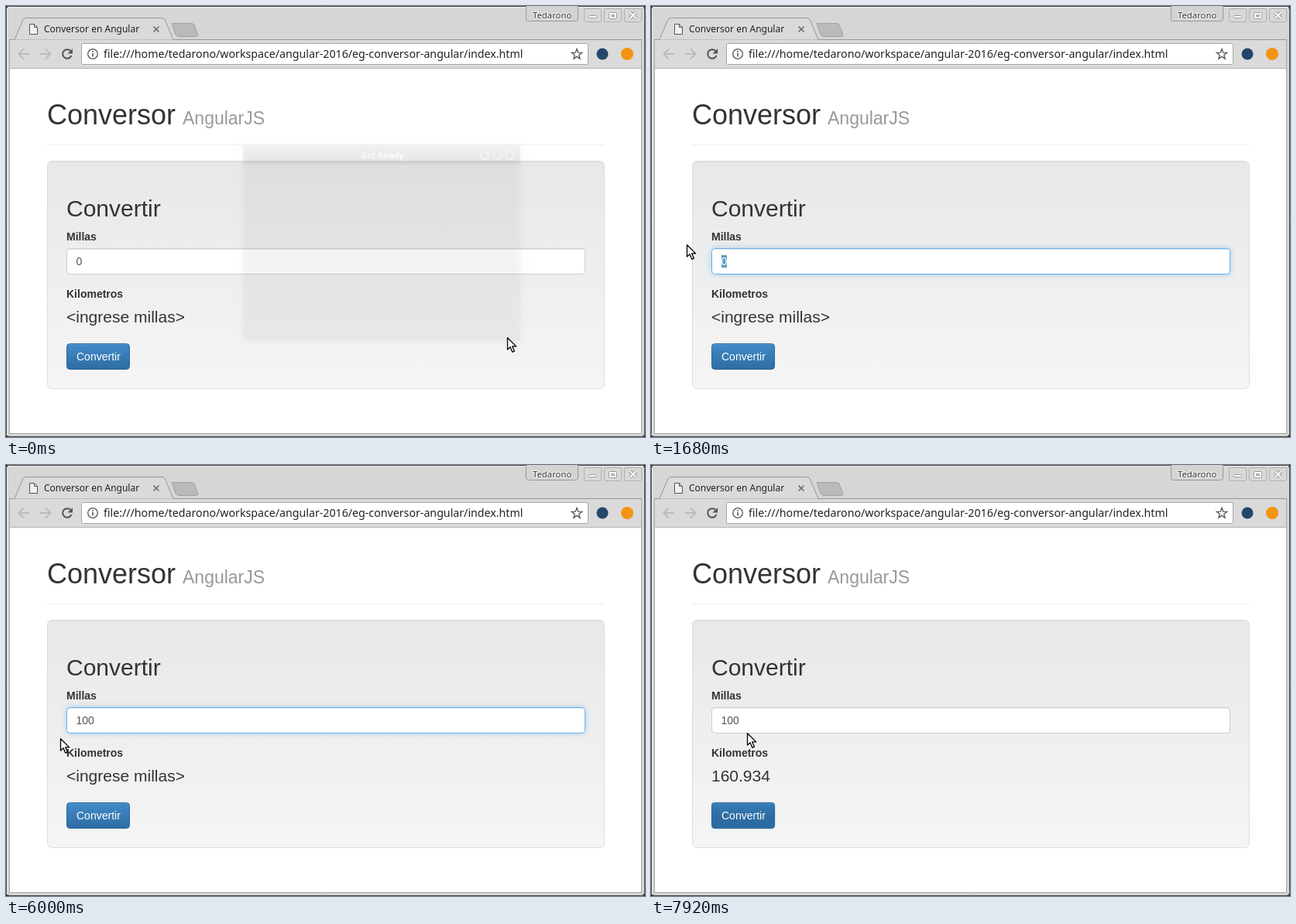
An HTML page with a canvas that plays this animation: 825x557 px, repeating every 8000 ms.

```html
<!DOCTYPE html>
<html lang="es">
<head>
<meta charset="utf-8">
<title>Conversor en Angular</title>
<style>
html, body { margin: 0; width: 100%; height: 100%; overflow: hidden; background: #fff; }
canvas { display: block; }
</style>
</head>
<body>
<canvas id="stage" width="825" height="557"></canvas>
<script>
const ctx = document.getElementById('stage').getContext('2d');
const LOOP = 8000, STEP = 120;
const PAGE = '"Liberation Sans", Arial, sans-serif';
const UI = '"Noto Sans", "Open Sans", sans-serif';

// start time, pointer kind, x, y
const POINTER = [
  [0, 'arrow', 647, 428], [360, 'arrow', 618, 424], [480, 'arrow', 510, 398],
  [600, 'arrow', 372, 366], [720, 'ibeam', 262, 338], [840, 'ibeam', 178, 331],
  [960, 'ibeam', 144, 328], [1080, 'ibeam', 121, 328], [1200, 'ibeam', 108, 328],
  [1320, 'ibeam', 88, 326], [1440, 'ibeam', 66, 322], [1560, 'ibeam', 52, 318],
  [1680, 'arrow', 46, 308], [5880, 'arrow', 53, 322], [6000, 'arrow', 70, 353],
  [6120, 'arrow', 80, 394], [6240, 'arrow', 87, 424], [6360, 'hand', 85, 438],
  [6480, 'hand', 87, 442], [6600, 'hand', 89, 444], [7320, 'hand', 92, 440],
  [7440, 'arrow', 108, 408], [7560, 'arrow', 120, 369], [7680, 'arrow', 125, 349],
  [7920, 'arrow', 124, 346]
];
const VALUE = [[0, '0'], [3720, '1'], [5400, '10'], [5520, '100']];

const at = (track, t) => track.filter(key => key[0] <= t).pop();
const within = (t, from, to) => t >= from && t < to;
const clamp = v => Math.max(0, Math.min(1, v));

function text(str, x, y, font, color) {
  ctx.font = font;
  ctx.fillStyle = color;
  ctx.fillText(str, x, y);
}

function rect(x, y, w, h, color) {
  ctx.fillStyle = color;
  ctx.fillRect(x, y, w, h);
}

function box(x, y, w, h, r, fill, stroke) {
  ctx.beginPath();
  ctx.roundRect(x + .5, y + .5, w - 1, h - 1, r);
  ctx.fillStyle = fill;
  ctx.fill();
  if (stroke) {
    ctx.strokeStyle = stroke;
    ctx.lineWidth = 1;
    ctx.stroke();
  }
}

function shape(points, fill, stroke, width = 1, closed = true) {
  ctx.beginPath();
  points.forEach(([x, y]) => ctx.lineTo(x, y));
  if (closed) ctx.closePath();
  if (fill) { ctx.fillStyle = fill; ctx.fill(); }
  if (stroke) { ctx.strokeStyle = stroke; ctx.lineWidth = width; ctx.stroke(); }
}

const line = (points, color, width) => shape(points, null, color, width, false);

function disc(x, y, r, fill, stroke, width) {
  ctx.beginPath();
  ctx.arc(x, y, r, 0, Math.PI * 2);
  if (fill) { ctx.fillStyle = fill; ctx.fill(); }
  if (stroke) { ctx.strokeStyle = stroke; ctx.lineWidth = width; ctx.stroke(); }
}

function vertical(y0, y1, from, to) {
  const g = ctx.createLinearGradient(0, y0, 0, y1);
  g.addColorStop(0, from);
  g.addColorStop(1, to);
  return g;
}

function drawWindow() {
  rect(0, 0, 825, 557, '#333');
  box(0, 0, 825, 557, 4, '#d6d6d6', '#444');
  line([[2, 1.5], [823, 1.5]], '#eee', 1);
  line([[1.5, 3], [1.5, 555]], '#eee', 1);
  rect(4, 43, 817, 510, '#a6a6a6');
  rect(5, 44, 815, 36, '#dadada');
  rect(5, 80, 815, 1, '#b4b4b4');
  rect(5, 81, 815, 471, '#fff');

  // tabs
  shape([[5, 43.5], [11, 43.5], [22, 17.5], [25, 15.5], [202, 15.5], [205, 17.5], [216, 43.5]], '#dadada');
  line([[4, 43.5], [11, 43.5], [22, 17.5], [25, 15.5], [202, 15.5], [205, 17.5], [216, 43.5], [821, 43.5]], '#969696', 1);
  shape([[214, 22.5], [240, 22.5], [243, 24], [248, 38], [246, 39.5], [222, 39.5], [219, 37]], '#bababa', '#a2a2a2');
  shape([[30.5, 23.5], [36.5, 23.5], [40.5, 27.5], [40.5, 36.5], [30.5, 36.5]], '#f1f1f1', '#555');
  line([[36.5, 23.5], [36.5, 27.5], [40.5, 27.5]], '#555', 1);
  text('Conversor en Angular', 49, 34, '12px ' + UI, '#222');
  line([[190.5, 26.5], [197.5, 33.5]], '#666', 1.5);
  line([[197.5, 26.5], [190.5, 33.5]], '#666', 1.5);

  // title bar controls
  box(671, -2, 68, 22, 3, '#d3d3d3', '#999');
  ctx.font = '11.3px ' + UI;
  ctx.strokeStyle = '#f4f4f4';
  ctx.lineWidth = 2;
  ctx.strokeText('Tedarono', 680, 16);
  text('Tedarono', 680, 16, ctx.font, '#333');
  for (const x of [746, 772, 798]) box(x, 3, 23, 18, 2, '#d8d8d8', '#b0b0b0');
  box(752, 12, 11, 4, 1, '#fff', '#999');
  box(778, 8, 11, 9, 1, '#fff', '#999');
  box(781, 11, 5, 3, 0, '#d8d8d8', '#999');
  for (const [color, width] of [['#999', 4], ['#fff', 2]]) {
    line([[805.5, 8], [813.5, 16]], color, width);
    line([[813.5, 8], [805.5, 16]], color, width);
  }

  // toolbar
  for (const [x, dir] of [[23, -1], [51, 1]]) {
    line([[x - 7 * dir, 62], [x + 6 * dir, 62]], '#bcbcbc', 2);
    line([[x, 55.5], [x + 6.5 * dir, 62], [x, 68.5]], '#bcbcbc', 2);
  }
  ctx.beginPath();
  ctx.arc(79, 62, 5.8, .35, Math.PI * 1.75);
  ctx.strokeStyle = '#555';
  ctx.lineWidth = 2;
  ctx.stroke();
  shape([[86, 55], [86, 61.5], [79.5, 61.5]], '#555');
  box(97, 48, 655, 28, 2, '#fff', '#a5a5a5');
  disc(112, 62, 6.3, null, '#555', 1.3);
  rect(111.2, 58, 1.6, 1.8, '#555');
  rect(111.2, 61, 1.6, 4.5, '#555');
  text('file:///home/tedarono/workspace/angular-2016/eg-conversor-angular/index.html',
    126, 67, '14.2px ' + UI, '#222');
  const star = Array.from({ length: 10 }, (_, i) => {
    const a = i * Math.PI / 5 - Math.PI / 2, r = i % 2 ? 2.9 : 7;
    return [737 + r * Math.cos(a), 62.5 + r * Math.sin(a)];
  });
  shape(star, null, '#555', 1.3);
  disc(770, 62, 7.5, '#24466a');
  disc(802, 62, 8, '#f39512');
}

function drawPage() {
  text('Conversor', 53, 153, '36px ' + PAGE, '#333');
  text('AngularJS', 228, 153, '23px ' + PAGE, '#999');
  rect(53, 179, 720, 1, '#eee');
  box(53, 200, 720, 295, 6, vertical(200, 495, '#e8e8e8', '#f5f5f5'), '#dcdcdc');
  rect(58, 201, 710, 1, 'rgba(0,0,0,.04)');
  text('Convertir', 78, 272, '30px ' + PAGE, '#333');
  text('Millas', 78, 303, 'bold 14px ' + PAGE, '#333');
  text('Kilometros', 78, 377, 'bold 14px ' + PAGE, '#333');
}

function drawInput(t) {
  const focus = within(t, 1200, 6960) ? clamp((t - 1110) / 150) : 0;
  ctx.save();
  ctx.shadowColor = `rgba(102,175,233,${.6 * focus})`;
  ctx.shadowBlur = 8;
  box(78, 313, 670, 34, 4, '#fff');
  ctx.restore();
  box(78, 313, 670, 34, 4, '#fff', focus ? '#66afe9' : '#ccc');
  rect(81, 314, 664, 1, 'rgba(0,0,0,.075)');

  const value = at(VALUE, t)[1];
  const selected = within(t, 1320, 3720);
  if (selected) rect(91, 322, 7, 16, '#589ec4');
  text(value, 90.5, 335, '14px ' + PAGE, selected ? '#fff' : '#555');

  const caret = within(t, 1200, 1320) || within(t, 3720, 4320) || within(t, 4920, 6000);
  if (caret) rect(Math.round(91 + ctx.measureText(value).width), 322, 1, 16, '#333');

  if (within(t, 3720, 5640)) {
    box(77, 347, 671, 26, 0, '#fff', '#b8b8b8');
    rect(79, 346, 668, 1, '#66afe9');
    text('10', 86, 364, 'bold 12px ' + UI, '#000');
  }
}

function drawButton(t) {
  const pressed = within(t, 6840, 6960);
  const shift = t >= 6360 ? 15 : 0;
  const fill = pressed ? '#2d6ca2' : vertical(436 - shift, 470 - shift, '#428bca', '#2d6ca2');
  if (t >= 6840) box(77, 435, 84, 36, 4, 'rgba(120,165,210,.3)');
  box(78, 436, 82, 34, 4, fill, '#2b669a');
  if (pressed) rect(79, 437, 80, 3, 'rgba(0,0,0,.08)');
  else rect(81, 437, 76, 1, 'rgba(255,255,255,.12)');
  text('Convertir', 91, 458, '14px ' + PAGE, '#fff');
}

function drawFadingDialog() {
  ctx.save();
  ctx.shadowColor = 'rgba(0,0,0,.5)';
  ctx.shadowBlur = 8;
  ctx.shadowOffsetY = 1;
  rect(306, 180, 358, 253, 'rgba(190,200,198,.07)');
  ctx.restore();
  rect(306, 180, 358, 25, vertical(180, 205, 'rgba(170,180,178,.06)', 'rgba(150,160,158,.17)'));
  ctx.textAlign = 'center';
  text('Get Ready', 486, 197, 'bold 11px ' + UI, 'rgba(255,255,255,.75)');
  ctx.textAlign = 'left';
  for (const x of [618, 634, 650]) disc(x, 193, 5, null, 'rgba(255,255,255,.5)', 1.5);
}

const pointers = {
  arrow() {
    shape([[.5, .8], [.5, 16], [4, 12.8], [6.8, 19.2], [9.4, 18.1], [6.7, 11.9], [11.7, 11.9]],
      '#fff', '#000', 1.3);
  },
  ibeam() {
    for (const [color, width, grow] of [['#000', 3, 1], ['#fff', 1, 0]]) {
      line([[.5, -6 - grow], [.5, 7 + grow]], color, width);
      for (const y of [-6.5, 7.5]) line([[-2 - grow, y], [3 + grow, y]], color, width);
    }
  },
  hand() {
    shape([[4.5, 1], [6, .5], [7.3, 1.5], [7.5, 5.5], [13, 6.5], [15.2, 8], [15, 11.5],
      [13.5, 13.5], [13.5, 15.7], [5.5, 15.7], [5, 13.5], [1, 9.5], [1, 8], [2.5, 7.5],
      [4.5, 9.3]], '#fff', '#000', 1.3);
    for (const x of [7.6, 10, 12.5]) line([[x, 6.5], [x, 9]], '#000', 1);
  }
};

function drawPointer(t) {
  const [, kind, x, y] = at(POINTER, t);
  ctx.save();
  ctx.translate(x, y);
  ctx.lineJoin = 'round';
  pointers[kind]();
  ctx.restore();
}

function render(now) {
  const t = Math.floor(now % LOOP / STEP) * STEP;
  drawWindow();
  drawPage();
  text(t < 6960 ? '<ingrese millas>' : '160.934', 78, 409, '21px ' + PAGE, '#333');
  drawInput(t);
  drawButton(t);
  if (t < STEP) drawFadingDialog();
  drawPointer(t);
}

let start;
function tick(now) {
  start ??= now;
  render(Math.max(0, now - start));
  requestAnimationFrame(tick);
}
render(0);
requestAnimationFrame(tick);
</script>
</body>
</html>
```
